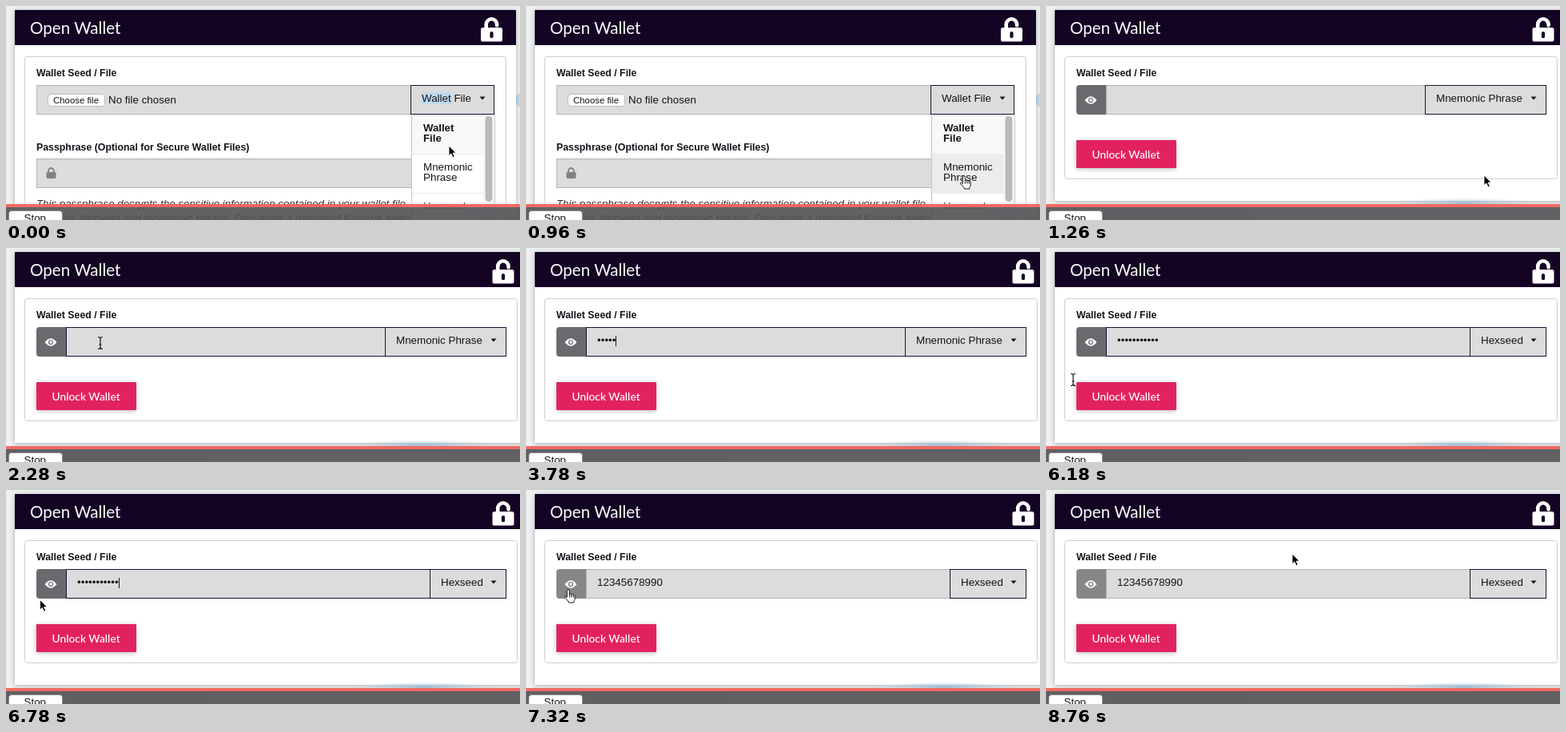
These frames come from a looping animation (643x268 px, 8820 ms). An HTML page:

```html
<!DOCTYPE html>
<html lang="en">
<head>
<meta charset="utf-8">
<title>Open Wallet</title>
<style>
html, body { margin: 0; width: 100%; height: 100%; overflow: hidden; background: #eef0f1; }
svg { display: block; width: 643px; height: 268px; }
text { font: 13.4px "Liberation Sans", Arial, sans-serif; fill: #15131a; white-space: pre; }
.head { font: 20.6px Lato, sans-serif; fill: #fff; }
.cta { font: 500 13.8px Lato, sans-serif; fill: #fff; }
.label { font-weight: bold; font-size: 12.35px; }
.note { font-style: italic; font-size: 13.3px; fill: #333; }
.small { font-size: 11.4px; }
.bold { font-weight: bold; font-size: 13.2px; }
.field { fill: #dcdcdc; stroke: #b4b4b6; }
.select { fill: #dcdcdc; stroke: #1b1030; }
.card { fill: none; stroke: #cfcfcf; }
.hide { display: none; }
</style>
</head>
<body>
<svg viewBox="0 0 643 268">
  <defs>
    <filter id="soft" x="-10%" y="-10%" width="120%" height="130%">
      <feDropShadow dx="0" dy="1" stdDeviation="3" flood-color="#000" flood-opacity=".28"/>
    </filter>
    <radialGradient id="blue">
      <stop offset="0" stop-color="#8db4d2" stop-opacity=".8"/>
      <stop offset="1" stop-color="#b9d3e6" stop-opacity="0"/>
    </radialGradient>
    <g id="lock">
      <rect y="13" width="27" height="17.5" rx="2.6" fill="#fff"/>
      <path d="M6.7 15V9a6.7 6.7 0 0 1 13.4 0v1.2" fill="none" stroke="#fff" stroke-width="4.6" stroke-linecap="round"/>
      <path d="M13.5 20v4.2" stroke="#130424" stroke-width="4.2" stroke-linecap="round"/>
    </g>
    <path id="caretDown" d="M0 0h7l-3.5 4z" fill="#15131a"/>
  </defs>

  <rect width="643" height="268" fill="#eef0f1"/>

  <g id="filePage">
    <ellipse cx="642" cy="118" rx="5" ry="8" fill="#c3def0"/>
    <rect x="11" y="5" width="627" height="290" fill="#fff" filter="url(#soft)"/>
    <rect x="11" y="5" width="627" height="44" fill="#130424"/>
    <use href="#lock" x="594" y="14"/>
    <rect class="card" x="23.5" y="63.5" width="602" height="240" rx="2"/>
    <rect class="field" x="38.5" y="99.5" width="469" height="36"/>
    <rect x="52.5" y="110.5" width="71" height="15" rx="3.5" fill="#fff" stroke="#bdbdbd"/>
    <text class="small" x="59" y="122">Choose file</text>
    <text x="128" y="122">No file chosen</text>
    <text class="label" x="38" y="181">Passphrase (Optional for Secure Wallet Files)</text>
    <rect class="field" x="38.5" y="191.5" width="573" height="36"/>
    <rect x="50.5" y="208" width="12" height="8" rx="1.3" fill="#828284"/>
    <path d="M53 209v-2.5a3.4 3.4 0 0 1 6.9 0v2.500" fill="none" stroke="#828284" stroke-width="1.9"/>
    <text class="note" x="38" y="252">This passphrase decrypts the sensitive information contained in your wallet file,</text>
    <text class="note" x="38" y="270">address, hexseed and mnemonic phrase. Only enter a password if you've selected</text>

    <rect x="507.500" y="135.500" width="104" height="140" fill="#fff" stroke="#c6c6c8"/>
    <rect x="508" y="136" width="89" height="49" fill="#f8f8f8"/>
    <rect id="row" x="508" y="186" width="89" height="48" fill="#ececec"/>
    <path d="M508 185.500h89M508 234.500h89" stroke="#ebebeb"/>
    <rect x="597" y="136" width="14" height="132" fill="#f7f7f7"/>
    <rect x="599.500" y="138" width="9" height="107" rx="4.500" fill="#b9b9b9"/>
    <text class="bold" x="522" y="157">Wallet</text>
    <text class="bold" x="522" y="170">File</text>
    <text x="522" y="206">Mnemonic</text>
    <text x="522" y="219">Phrase</text>
    <text x="522" y="255" fill-opacity=".75">Hexseed</text>
    <rect class="select" x="506.500" y="99.500" width="104" height="36"/>
    <rect id="mark" x="520" y="108" width="37" height="15" fill="#bfd9ec"/>
    <text x="520" y="120">Wallet File</text>
    <use href="#caretDown" x="592.500" y="113.500"/>
  </g>

  <g id="seedPage">
    <rect x="11" y="5" width="650" height="239" fill="#fff" filter="url(#soft)"/>
    <ellipse cx="522" cy="247" rx="92" ry="7" fill="url(#blue)"/>
    <rect x="11" y="5" width="632" height="44" fill="#130424"/>
    <use href="#lock" x="608.500" y="14"/>
    <rect class="card" x="23.500" y="63.500" width="616" height="153" rx="3"/>
    <rect id="input" class="field" x="75.500" y="99.500" height="36"/>
    <path id="eye" d="M42 99h33v37H42a4 4 0 0 1-4-4v-29a4 4 0 0 1 4-4z"/>
    <path d="M48.500 118q7.500-9.500 15 0q-7.500 9.500-15 0z" fill="#fff"/>
    <circle cx="56" cy="118" r="3.100" fill="#6b696d"/>
    <circle cx="56" cy="118" r="1.900" fill="#fff"/>
    <rect id="select" class="select" y="99.500" height="36"/>
    <text id="kind" y="120"></text>
    <use href="#caretDown" x="606.500" y="113.500"/>
    <text id="typed" x="89" y="120"></text>
    <rect id="caret" y="110" width="1" height="13" fill="#15131a"/>
    <rect x="38" y="168" width="125" height="35" fill="#e2235f" filter="url(#soft)"/>
    <text class="cta" x="57.500" y="190.500">Unlock Wallet</text>
  </g>

  <text class="head" x="30" y="35">Open Wallet</text>
  <text class="label" x="38" y="88">Wallet Seed / File</text>

  <rect y="252" width="643" height="16" fill="#525254" fill-opacity=".9"/>
  <rect y="248" width="643" height="4" fill="#f2635b" fill-opacity=".94"/>
  <rect x="3.500" y="256.500" width="67" height="20" rx="3.500" fill="#fff" stroke="#8a8a8a"/>
  <text x="22.500" y="270">Stop</text>

  <g id="cursor">
    <path id="arrow" d="M0 0V12.500L2.900 9.900 5 14.700 7.200 13.700 5.100 9.100H8.900z" fill="#000" stroke="#fff" stroke-width=".9"/>
    <path id="hand" d="M-1.700 9.500V1.200a1.500 1.500 0 0 1 3 0V6c0-1.200 2.400-1.200 2.500.2.200-1 2.300-.9 2.400.5.300-.8 2-.6 2 .8V11c0 2-1.500 2.500-1.500 5H.500c0-2-3.500-4-4.800-6.800-.6-1.400 1-2 2.600.3zM1.300 6v3.500M3.800 6.200v3.300M6.200 6.700v2.800" fill="#fff" stroke="#111" stroke-width="1"/>
    <path id="beam" d="M-3-7.500q3 0 3 2q0-2 3-2M0-5.500V5.500M-3 7.500q3 0 3-2q0 2 3 2M-1.500 2h3" fill="none" stroke="#111" stroke-width="1.200"/>
  </g>
</svg>
<script>
const LOOP = 8820, STEP = 60;
const OPEN = 1200, FOCUS = 1740, HEX = 5400, HOVER = 6840, REVEAL = 7140;
const SECRET = "12345678990";
const keys = [2700, 3060, 3240, 3540, 3780, 4080, 4320, 4560, 5040, 5220, 5400];
const caretOff = [[2280, 2700], [5880, 6360]];

// time, x, y, pointer shape
const path = [
  [0, 554, 175, "arrow"], [360, 555, 178, "arrow"], [780, 555, 178, "arrow"],
  [840, 553, 189, "hand"], [960, 548, 213, "hand"], [1200, 548, 212, "arrow"],
  [1260, 548, 212, "arrow"], [1320, 520, 198, "arrow"], [1560, 230, 132, "beam"],
  [1680, 135, 121, "beam"], [1740, 118, 119, "beam"], [2640, 118, 119, ""],
  [6060, 112, 122, "beam"], [6120, 70, 145, "beam"], [6180, 34, 165, "beam"],
  [6240, 14, 175, "arrow"], [6420, 6, 180, "arrow"], [6600, 20, 160, "arrow"],
  [6840, 50, 130, "hand"], [6900, 53, 125, "hand"], [8040, 53, 125, "hand"],
  [8160, 66, 122, "hand"], [8220, 88, 118, "beam"], [8280, 101, 117, "beam"],
  [8460, 101, 117, "beam"], [8520, 130, 110, "beam"], [8580, 190, 97, "arrow"],
  [8700, 290, 83, "arrow"], [8760, 308, 80, "arrow"]
];

const $ = id => document.getElementById(id);
const show = (id, on) => $(id).classList.toggle("hide", !on);
const set = (id, attrs) => {
  for (const name in attrs) $(id).setAttribute(name, attrs[name]);
};

function pointer(t) {
  const i = path.findLastIndex(p => p[0] <= t);
  const [t0, x0, y0, shape] = path[i];
  const [t1, x1, y1] = path[i + 1] || [LOOP, x0, y0];
  const k = (t - t0) / (t1 - t0);
  set("cursor", { transform: `translate(${x0 + (x1 - x0) * k} ${y0 + (y1 - y0) * k})` });
  for (const id of ["arrow", "hand", "beam"]) show(id, id === shape);
}

function draw(now) {
  const t = Math.floor(now % LOOP / STEP) * STEP;
  const focused = t >= FOCUS && t < REVEAL;
  const left = t < HEX ? 474 : 530;
  const count = keys.filter(k => k <= t).length;

  show("filePage", t < OPEN);
  show("seedPage", t >= OPEN);
  show("mark", t < 120);
  show("row", t >= 840);

  set("input", { width: left - 75, style: focused ? "stroke:#1b1030" : "" });
  set("select", { x: left + .5, width: 625 - left });
  set("kind", { x: left + 14 });
  $("kind").textContent = t < HEX ? "Mnemonic Phrase" : "Hexseed";
  $("typed").textContent = t < REVEAL ? "•".repeat(count) : SECRET;
  set("eye", { fill: t < HOVER ? "#6b696d" : "#888589" });

  show("caret", focused && !caretOff.some(([a, b]) => t >= a && t < b));
  set("caret", { x: Math.floor(89 + 4.75 * count) });
  pointer(t);
}

function tick() {
  draw(performance.now());
  requestAnimationFrame(tick);
}
tick();
</script>
</body>
</html>
```
